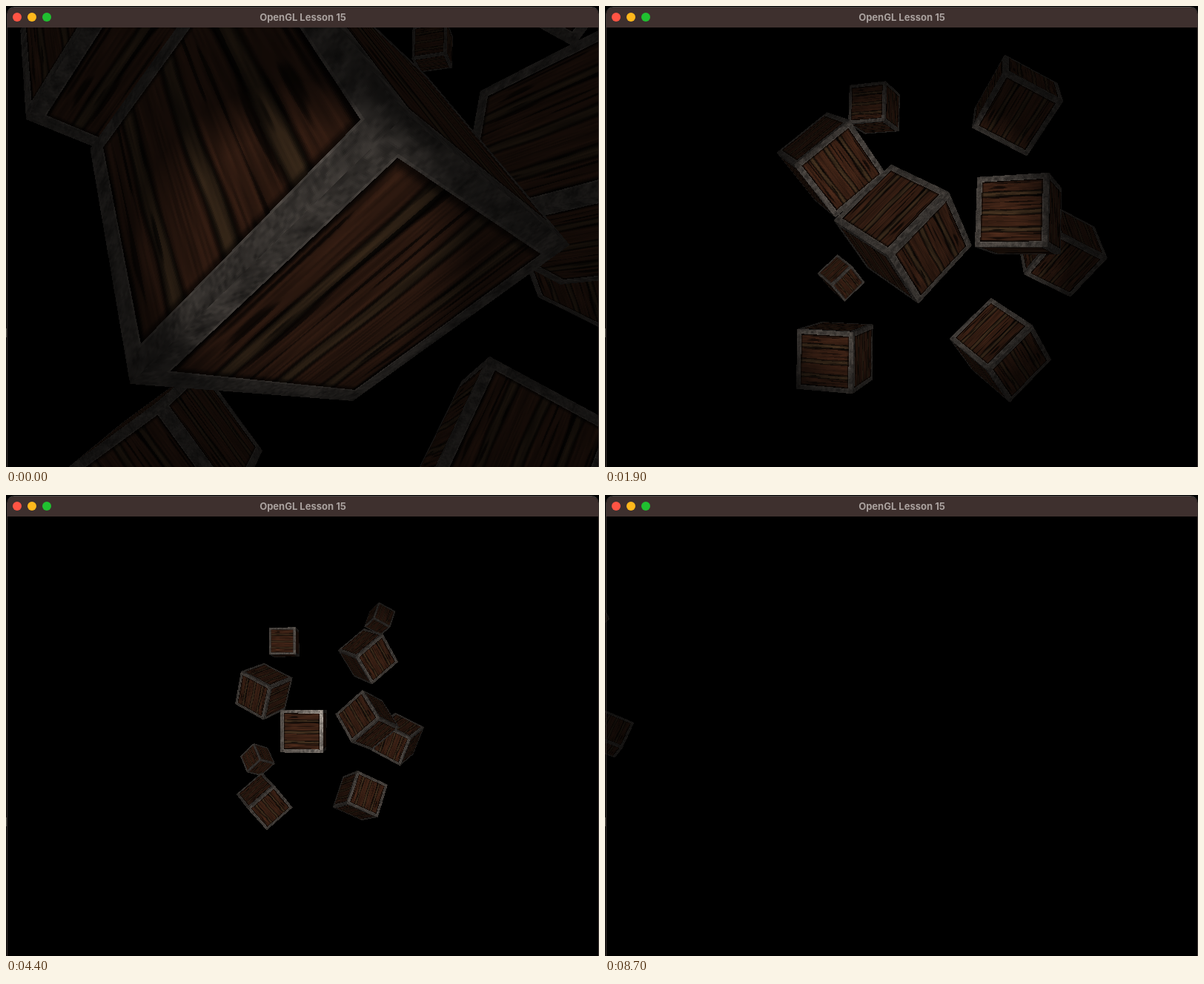
An HTML page with a canvas that plays this animation: 800 px wide and 622 px high, repeating every 8800 ms.

```html
<!DOCTYPE html>
<html lang="en">
<head>
<meta charset="utf-8">
<title>OpenGL Lesson 15</title>
<style>
  html, body { margin: 0; width: 100%; height: 100%; overflow: hidden; background: #000; }
  #stage { position: relative; width: 800px; height: 622px; overflow: hidden; background: #000; }
  canvas { position: absolute; left: 0; top: 29px; }
  #window {
    position: absolute; left: 1px; top: 1px; width: 797px; height: 640px;
    border: 1px solid #3e3634; border-top-color: #4a4a48; border-radius: 10px 10px 0 0; overflow: hidden;
  }
  #bar {
    height: 27px; background: #3e302e; color: #aaa29f;
    font: 700 13px/26px Inter, "Open Sans", sans-serif; text-align: center;
  }
  #bar i { position: absolute; top: 7px; width: 12px; height: 12px; border-radius: 50%; }
  #notch { position: absolute; left: 0; top: 435px; width: 1px; height: 12px; background: #484840; }
</style>
</head>
<body>
<div id="stage">
  <canvas id="view" width="800" height="593"></canvas>
  <div id="window">
    <div id="bar">
      <i style="left:7px;background:#ff5444"></i>
      <i style="left:27px;background:#ffb81c"></i>
      <i style="left:47px;background:#20c030"></i>
      OpenGL Lesson 15
    </div>
  </div>
  <div id="notch"></div>
</div>
<script>
const W = 800, H = 593, CX = 400, CY = 300, FOCAL = 724, LOOP = 8800;
const RAD = Math.PI / 180;
const ctx = document.getElementById('view').getContext('2d');
const image = ctx.createImageData(W, H);
const pixels = image.data;
const depth = new Float32Array(W * H);

const cubes = [
  [0, 0, 0], [2, 5, -15], [-1.5, -2.2, -2.5], [-3.8, -2, -12.3], [2.4, -0.4, -3.5],
  [-1.7, 3, -7.5], [1.3, -2, -2.5], [1.5, 2, -2.5], [1.5, 0.2, -1.5], [-1.3, 1, -1.5]
];

// Camera keys: [seconds, value]
const distanceKeys = [[0, 1.88], [0.7, 3.62], [1.9, 6.45], [2.7, 8.45], [4.4, 12.9], [6, 16.75]];
const yawKeys = [[6.3, -7.3], [7.2, 0.4], [8.1, 7.6], [8.7, 29.5]];
const pitchKeys = [[8.1, -3.55], [8.7, -4.5]];

const dot = (a, b) => a[0] * b[0] + a[1] * b[1] + a[2] * b[2];
const sub = (a, b) => [a[0] - b[0], a[1] - b[1], a[2] - b[2]];
const addScaled = (a, b, k) => [a[0] + b[0] * k, a[1] + b[1] * k, a[2] + b[2] * k];
const clamp = (v, lo = 0, hi = 1) => Math.min(hi, Math.max(lo, v));
const mix = (a, b, k) => a + (b - a) * k;
const smooth = (lo, hi, v) => { const k = clamp((v - lo) / (hi - lo)); return k * k * (3 - 2 * k); };

function valueAt(keys, t) {
  if (t <= keys[0][0]) return keys[0][1];
  for (let i = 1; i < keys.length; i++) {
    const [t0, a] = keys[i - 1], [t1, b] = keys[i];
    if (t <= t1) return mix(a, b, (t - t0) / (t1 - t0));
  }
  return keys[keys.length - 1][1];
}

function hash(x, y) {
  const s = Math.sin(x * 127.1 + y * 311.7) * 43758.5453;
  return s - Math.floor(s);
}

function noise(x, y) {
  const ix = Math.floor(x), iy = Math.floor(y);
  const fx = smooth(0, 1, x - ix), fy = smooth(0, 1, y - iy);
  return mix(mix(hash(ix, iy), hash(ix + 1, iy), fx),
             mix(hash(ix, iy + 1), hash(ix + 1, iy + 1), fx), fy);
}

// Wide planks alternate with narrow, paler strips
const seams = [0, 0.16, 0.24, 0.44, 0.52, 0.74, 0.82, 1];

// Colour and shininess of the crate: planks along u inside a metal frame
function crateTexel(u, v) {
  const edge = Math.min(u, v, 1 - u, 1 - v), border = 0.08;
  if (edge < border) {
    const k = (0.55 + 0.5 * noise(u * 22, v * 22) + 0.4 * noise(u * 90, v * 90))
      * (edge > border - 0.01 ? 1.25 : 1);
    return [98 * k, 91 * k, 85 * k, 0.8 * k];
  }
  const row = clamp((v - border) / (1 - 2 * border) + 0.03 * (noise(u * 4, v * 6) - 0.5), 0, 0.999);
  const plank = seams.findIndex(s => s > row) - 1;
  const seam = Math.min(row - seams[plank], seams[plank + 1] - row);
  const pale = plank % 2;
  const grain = noise(u * 6 + plank * 9, v * 110), streak = noise(u * 3 + 40, v * 45);
  let k = 0.6 + 0.45 * grain + 0.35 * streak;
  k *= 0.4 + 0.6 * smooth(0.15, 0.3, streak);
  k *= 0.35 + 0.65 * smooth(0, 0.025, seam);
  k *= 0.4 + 0.6 * smooth(0, 0.03, edge - border);
  return [mix(88, 92, pale) * k, mix(49, 66, pale) * k, mix(31, 42, pale) * k, 0];
}

function buildMips() {
  let size = 256, data = new Float32Array(size * size * 4);
  for (let y = 0; y < size; y++)
    for (let x = 0; x < size; x++)
      data.set(crateTexel((x + 0.5) / size, (y + 0.5) / size), (y * size + x) * 4);
  const mips = [{ size, data }];
  while (size > 16) {
    const half = size / 2, small = new Float32Array(half * half * 4);
    for (let y = 0; y < half; y++)
      for (let x = 0; x < half; x++)
        for (let c = 0; c < 4; c++) {
          const p = (2 * y * size + 2 * x) * 4 + c;
          small[(y * half + x) * 4 + c] =
            (data[p] + data[p + 4] + data[p + size * 4] + data[p + size * 4 + 4]) / 4;
        }
    size = half;
    data = small;
    mips.push({ size, data });
  }
  return mips;
}
const mips = buildMips();

// The flashlight sits at the camera, so its cone is fixed on screen
const invLength = new Float32Array(W * H), spot = new Float32Array(W * H);
const outer = Math.cos(17.5 * RAD), inner = Math.cos(12.5 * RAD);
for (let y = 0, i = 0; y < H; y++)
  for (let x = 0; x < W; x++, i++) {
    invLength[i] = 1 / Math.hypot(FOCAL, x + 0.5 - CX, y + 0.5 - CY);
    spot[i] = clamp((FOCAL * invLength[i] - outer) / (inner - outer));
  }

function cameraAt(t) {
  const d = valueAt(distanceKeys, t);
  const yaw = valueAt(yawKeys, t) * RAD, pitch = valueAt(pitchKeys, t) * RAD;
  const sy = Math.sin(yaw), cy = Math.cos(yaw), sp = Math.sin(pitch), cp = Math.cos(pitch);
  return {
    pos: [0.127 * d - 0.03, 0.062 * (d - 3.2), d],
    forward: [sy * cp, sp, -cy * cp],
    right: [cy, 0, sy],
    up: [-sy * sp, cp, cy * sp]
  };
}

// Images of the x, y and z axes after a turn about (0.5, 1, 0)
function cubeAxes(angle) {
  const c = Math.cos(angle), s = Math.sin(angle), k = 1 - c;
  const ax = 0.4472, ay = 0.8944;
  return [
    [c + ax * ax * k, ax * ay * k, -ay * s],
    [ax * ay * k, c + ay * ay * k, ax * s],
    [ay * s, -ax * s, c]
  ];
}

function drawFace(cam, center, normal, uAxis, vAxis) {
  const faceCenter = addScaled(center, normal, 0.5);
  const plane = dot(normal, sub(faceCenter, cam.pos));
  if (plane >= 0) return;

  let x0 = W, x1 = 0, y0 = H, y1 = 0;
  for (const [a, b] of [[-0.5, -0.5], [0.5, -0.5], [0.5, 0.5], [-0.5, 0.5]]) {
    const p = sub(addScaled(addScaled(faceCenter, uAxis, a), vAxis, b), cam.pos);
    const scale = FOCAL / Math.max(0.05, dot(p, cam.forward));
    const x = CX + dot(p, cam.right) * scale, y = CY - dot(p, cam.up) * scale;
    x0 = Math.min(x0, x); x1 = Math.max(x1, x);
    y0 = Math.min(y0, y); y1 = Math.max(y1, y);
  }
  const extent = Math.max(x1 - x0, y1 - y0);
  const mip = mips.find(m => m.size <= extent * 1.3) || mips[mips.length - 1];
  const { size, data } = mip;
  x0 = Math.max(0, Math.floor(x0)); x1 = Math.min(W, Math.ceil(x1));
  y0 = Math.max(0, Math.floor(y0)); y1 = Math.min(H, Math.ceil(y1));

  const offset = sub(cam.pos, center);
  const uStart = dot(uAxis, offset) + 0.5, vStart = dot(vAxis, offset) + 0.5;
  const nStep = dot(normal, cam.right), uStep = dot(uAxis, cam.right), vStep = dot(vAxis, cam.right);

  for (let y = y0; y < y1; y++) {
    const rowRay = addScaled(
      addScaled(cam.forward.map(v => v * FOCAL), cam.right, x0 + 0.5 - CX), cam.up, CY - y - 0.5);
    let n = dot(normal, rowRay), ur = dot(uAxis, rowRay), vr = dot(vAxis, rowRay);
    for (let x = x0, i = y * W + x0; x < x1; x++, i++, n += nStep, ur += uStep, vr += vStep) {
      const t = plane / n;
      if (!(t > 0 && t < depth[i])) continue;
      const u = uStart + t * ur, v = vStart + t * vr;
      if (u < 0 || u >= 1 || v < 0 || v >= 1) continue;
      depth[i] = t;

      const q = (Math.floor(v * size) * size + Math.floor(u * size)) * 4;
      const facing = -n * invLength[i];
      const light = 0.2 + 0.5 * facing * spot[i];
      let shine = 0;
      if (data[q + 3] > 0 && facing > 0.9)
        shine = 190 * data[q + 3] * spot[i] * (2 * facing * facing - 1) ** 40;
      const o = i * 4;
      pixels[o] = data[q] * light + shine;
      pixels[o + 1] = data[q + 1] * light + shine * 0.96;
      pixels[o + 2] = data[q + 2] * light + shine * 0.92;
    }
  }
}

function drawScene(t) {
  const cam = cameraAt(t);
  depth.fill(Infinity);
  for (let o = 0; o < pixels.length; o += 4) {
    pixels[o] = pixels[o + 1] = pixels[o + 2] = 0;
    pixels[o + 3] = 255;
  }
  cubes.forEach((center, i) => {
    const [x, y, z] = cubeAxes((50 + 20 * i) * (t + 10) * RAD);
    const flip = a => a.map(v => -v);
    for (const [normal, u, v] of [[x, y, flip(z)], [y, x, flip(z)], [z, x, y]]) {
      drawFace(cam, center, normal, u, v);
      drawFace(cam, center, flip(normal), u, v);
    }
  });
  ctx.putImageData(image, 0, 0);
}

// The picture advances ten times a second
let shown = -1;
function tick() {
  const step = Math.floor(((performance.now() + 1) % LOOP) / 100);
  if (step !== shown) {
    shown = step;
    drawScene(step / 10);
  }
  requestAnimationFrame(tick);
}
tick();
</script>
</body>
</html>
```
